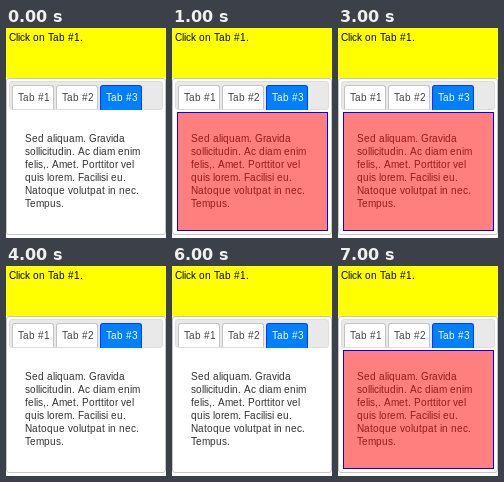
Recreate the animation shown at these times as an HTML page. Size 160 px wide and 210 px high, loop 8000 ms.

```html
<!DOCTYPE html>
<html lang="en">
<head>
<meta charset="utf-8">
<title>Tabs</title>
<style>
* { box-sizing: border-box; }
html, body { margin: 0; width: 100%; height: 100%; overflow: hidden; background: #fff; }
body { position: relative; }
div, svg { position: absolute; }
svg { left: 0; top: 0; font: 10px "Liberation Sans", Arial, sans-serif; }
.query { left: 0; top: 0; width: 160px; height: 50px; background: #ff0; }
.widget { left: 0; top: 50px; width: 160px; height: 157px; border: 1px solid #c5c5c5; border-radius: 3px; }
.nav { left: 3px; top: 53px; width: 154px; height: 29px; border: 1px solid #ddd; border-radius: 3px; background: #e9e9e9; }
.tab {
  top: 57px; width: 42px; height: 24px;
  border: 1px solid #c5c5c5; border-bottom: 0; border-radius: 3px 3px 0 0;
  background: #fff;
}
.tab.active { height: 25px; border-color: #003eff; background: #007fff; }
.highlight {
  left: 5px; top: 84px; width: 151px; height: 119px;
  border: 1px solid #00f; background: rgba(255, 0, 0, .5);
  animation: blink 2s step-end infinite;
}
@keyframes blink {
  0% { visibility: hidden; }
  50%, 100% { visibility: visible; }
}
</style>
</head>
<body>
<div class="query"></div>
<div class="widget"></div>
<div class="nav"></div>
<div class="tab" style="left: 6px"></div>
<div class="tab" style="left: 50px"></div>
<div class="tab active" style="left: 94px"></div>
<svg width="160" height="210">
  <text x="3" y="13">Click on Tab #1.</text>
  <g fill="#454545">
    <text x="12" y="73">Tab #1</text>
    <text x="56" y="73">Tab #2</text>
    <text x="100" y="73" fill="#fff">Tab #3</text>
  </g>
  <g fill="#333">
    <text x="19" y="114">Sed aliquam. Gravida</text>
    <text x="19" y="127">sollicitudin. Ac diam enim</text>
    <text x="19" y="140">felis,. Amet. Porttitor vel</text>
    <text x="19" y="153">quis lorem. Facilisi eu.</text>
    <text x="19" y="166">Natoque volutpat in nec.</text>
    <text x="19" y="179">Tempus.</text>
  </g>
</svg>
<div class="highlight"></div>
<script>
const ctx = document.createElement('canvas').getContext('2d');
ctx.font = '10px "Liberation Sans", Arial, sans-serif';
const width = s => ctx.measureText(s).width;

// Set glyphs on whole pixels: rounded advance plus rounded kerning.
function snap(text) {
  const chars = [...text.textContent];
  let x = Number(text.getAttribute('x'));
  const places = chars.map((c, i) => {
    const place = x;
    const next = chars[i + 1] || '';
    const kern = width(c + next) - width(c) - width(next);
    x += Math.round(width(c)) + Math.round(kern);
    return place;
  });
  text.setAttribute('x', places.join(' '));
}
document.querySelectorAll('text').forEach(snap);
</script>
</body>
</html>
```
